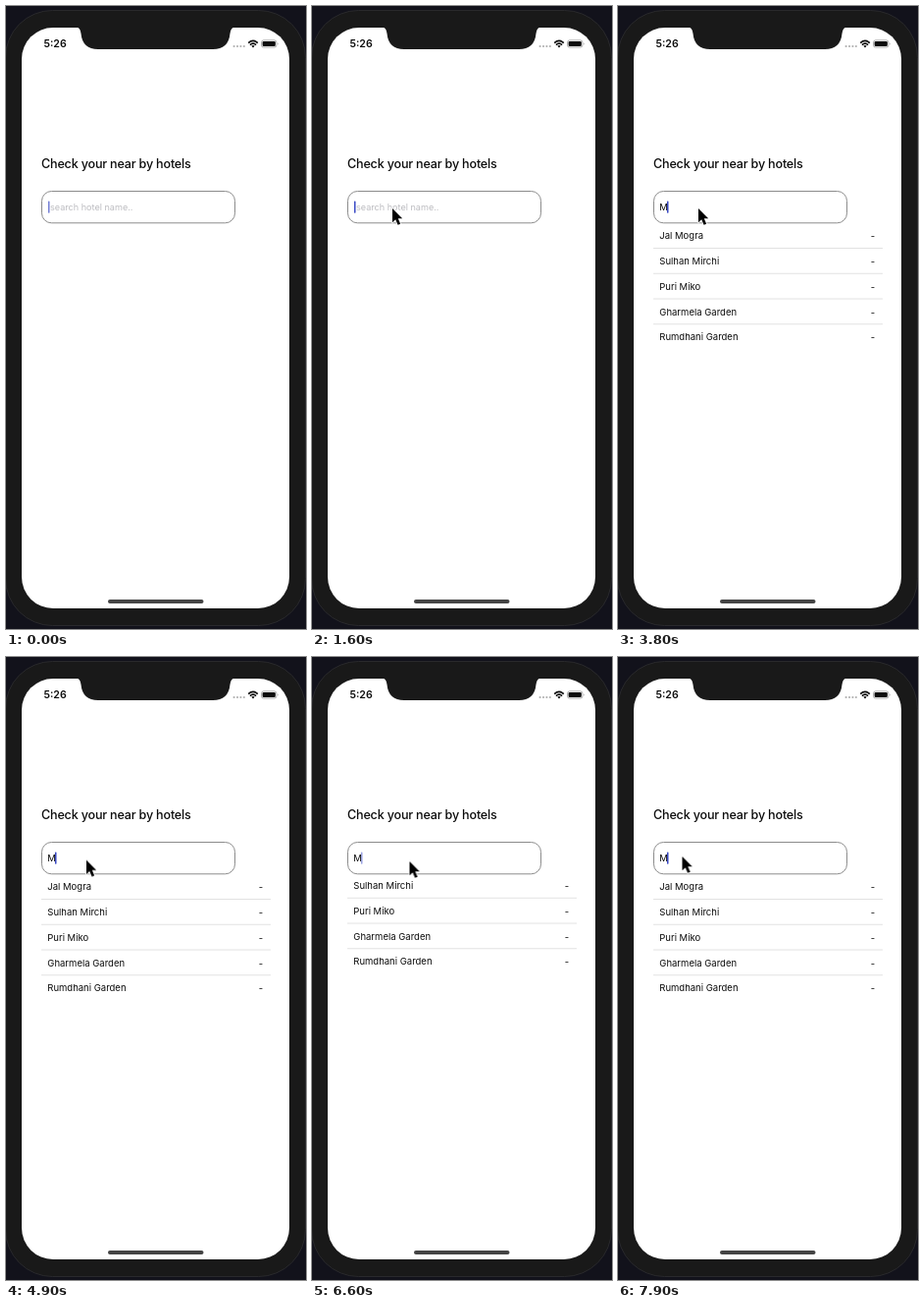
Recreate the animation shown at these times as an HTML page. Size 306 px wide and 634 px high, loop 8000 ms.

```html
<!DOCTYPE html>
<html lang="en">
<head>
<meta charset="utf-8">
<title>Hotel search</title>
<style>
  html, body { margin: 0; width: 100%; height: 100%; overflow: hidden; background: #12121b; }
  svg { display: block; width: 100vw; height: 100vh; }
  text { font-family: Inter, Roboto, "Liberation Sans", sans-serif; fill: #0c0c0c; }

  .clock { font-size: 10.6px; font-weight: 600; }
  .title { font-size: 12.6px; font-weight: 500; letter-spacing: -.2px; }
  .row { font-size: 9.5px; }
  .hint { font-size: 9.1px; fill: #bcbcc0; }
  .paste { font-size: 8.7px; fill: #f4f4f4; }

  .hint, .typed, .list, .popup, .blink, .shift, .scroll, .pointer {
    animation: 8s linear infinite;
  }
  .hint { animation-name: hint; animation-timing-function: step-end; }
  .typed { animation-name: typed; animation-timing-function: step-end; }
  .list { animation-name: list; animation-timing-function: step-end; }
  .shift { animation-name: shift; animation-timing-function: step-end; }
  .popup { animation-name: popup; }
  .blink { animation-name: blink; }
  .scroll { animation-name: scroll; }
  .pointer { animation-name: pointer; }

  @keyframes hint { 0% { opacity: 1; } 43.75%, 100% { opacity: 0; } }
  @keyframes typed { 0% { opacity: 0; } 43.75%, 100% { opacity: 1; } }
  @keyframes list { 0% { opacity: 0; } 45%, 100% { opacity: 1; } }
  @keyframes shift {
    0% { transform: translateX(0); }
    43.75%, 100% { transform: translateX(7px); }
  }
  @keyframes popup {
    0%, 22% { opacity: 0; }
    25%, 43.5% { opacity: 1; }
    46%, 100% { opacity: 0; }
  }
  @keyframes blink {
    0% { opacity: .7; }
    1.25%, 5% { opacity: 1; }
    6.25%, 8.5% { opacity: 0; }
    9.75%, 16% { opacity: 1; }
    17.5%, 19% { opacity: 0; }
    20%, 27% { opacity: 1; }
    28.75%, 31% { opacity: 0; }
    32.5%, 37.5% { opacity: 1; }
    39.5%, 41.25% { opacity: 0; }
    43%, 54% { opacity: 1; }
    55%, 57% { opacity: 0; }
    58.75%, 65.5% { opacity: 1; }
    67%, 69% { opacity: 0; }
    70.5%, 76.5% { opacity: 1; }
    78%, 81.5% { opacity: 0; }
    83.5%, 87% { opacity: 1; }
    88.75%, 91% { opacity: 0; }
    92.5%, 100% { opacity: 1; }
  }
  /* the list follows the drag at rubber-band pace, then springs back */
  @keyframes scroll {
    0%, 75% { transform: translateY(0); animation-timing-function: ease-in-out; }
    82.5%, 91% { transform: translateY(-27px); animation-timing-function: cubic-bezier(.2, .7, .3, 1); }
    97.5%, 100% { transform: translateY(0); }
  }
  @keyframes pointer {
    0%, 3.5% { transform: translate(310px, 640px); animation-timing-function: ease-in; }
    8.75% { transform: translate(112px, 262px); animation-timing-function: ease-out; }
    12.5%, 60.5% { transform: translate(82px, 206px); animation-timing-function: ease-in-out; }
    71.25%, 75% { transform: translate(76px, 276px); animation-timing-function: ease-in-out; }
    82.5%, 91% { transform: translate(99.5px, 208px); animation-timing-function: ease-in-out; }
    98.75%, 100% { transform: translate(65.5px, 203px); }
  }
</style>
</head>
<body>
<svg viewBox="0 0 306 634">
  <defs>
    <clipPath id="listArea"><rect x="16" y="221.5" width="273" height="300"/></clipPath>
  </defs>

  <!-- phone -->
  <rect x="-.5" y="4.5" width="306" height="626" rx="48" fill="#191919" stroke="#29292c"/>
  <rect x="16" y="22" width="273" height="591" rx="32" fill="#fff"/>
  <path d="M71 21 Q76 22 76.5 28 Q78 44 94 44 H211 Q227 44 228.5 28 Q229 22 234 21 Z" fill="#191919"/>
  <rect x="104" y="604" width="97.5" height="4" rx="2" fill="#444"/>

  <!-- status bar -->
  <text class="clock" x="38.5" y="42.3">5:26</text>
  <g fill="#b0b0b0">
    <circle cx="232.6" cy="41" r="1.1"/><circle cx="236" cy="41" r="1.1"/>
    <circle cx="239.4" cy="41" r="1.1"/><circle cx="242.8" cy="41" r="1.1"/>
  </g>
  <g fill="none" stroke="#0c0c0c" stroke-width="1.6">
    <path d="M247.2 37.6 Q252 33.2 256.8 37.6"/>
    <path d="M248.9 39.6 Q252 36.8 255.1 39.6"/>
  </g>
  <path d="M250.3 40.6 Q252 39.2 253.7 40.6 L252 42.4 Z" fill="#0c0c0c"/>
  <rect x="260.5" y="34.9" width="15.4" height="7.2" rx="2.2" fill="none" stroke="#999" stroke-width=".8"/>
  <rect x="261.6" y="36" width="13.2" height="5" rx="1.2" fill="#0c0c0c"/>
  <path d="M277 37.2 q1.3 1.3 0 2.6 Z" fill="#999"/>

  <!-- search -->
  <text class="title" x="36" y="165.3">Check your near by hotels</text>
  <rect x="36.5" y="188.5" width="197" height="32.3" rx="10" fill="#fff" stroke="#8c8c8c"/>
  <text class="hint" x="45" y="207.8">search hotel name..</text>
  <text class="row typed" x="42.3" y="208">M</text>
  <g class="shift"><rect class="blink" x="43" y="198.5" width="1.5" height="12.2" rx=".6" fill="#3848c4"/></g>

  <g clip-path="url(#listArea)"><g class="list"><g class="scroll" id="rows"></g></g></g>

  <g class="popup">
    <path d="M27.5 162.5 H64 a5 5 0 0 1 5 5 V182 a5 5 0 0 1 -5 5 H48.5 L43.5 192.5 L38.5 187 H27.5 a5 5 0 0 1 -5 -5 V167.5 a5 5 0 0 1 5 -5 Z" fill="#000"/>
    <text class="paste" x="34" y="178">Paste</text>
  </g>

  <g class="pointer">
    <path d="M0 0 V14.2 L3.2 11.2 L5.6 16.8 L8.2 15.7 L5.8 10.3 H10.2 Z" fill="#000" stroke="#fff" stroke-width="1.6" stroke-linejoin="round" paint-order="stroke"/>
  </g>
</svg>
<script>
  const names = ["Jal Mogra", "Sulhan Mirchi", "Puri Miko", "Gharmela Garden", "Rumdhani Garden"];
  const pitch = 25.75;

  document.getElementById("rows").innerHTML = names.map((name, i) => {
    const y = 237.3 + i * pitch;
    const rule = i < names.length - 1
      ? `<path d="M36 ${y + 9.2} H270" stroke="#e2e2e2" stroke-width="1"/>` : "";
    return `<text class="row" x="42.3" y="${y}">${name}</text>
      <text class="row" x="257.8" y="${y}">-</text>${rule}`;
  }).join("");
</script>
</body>
</html>
```
